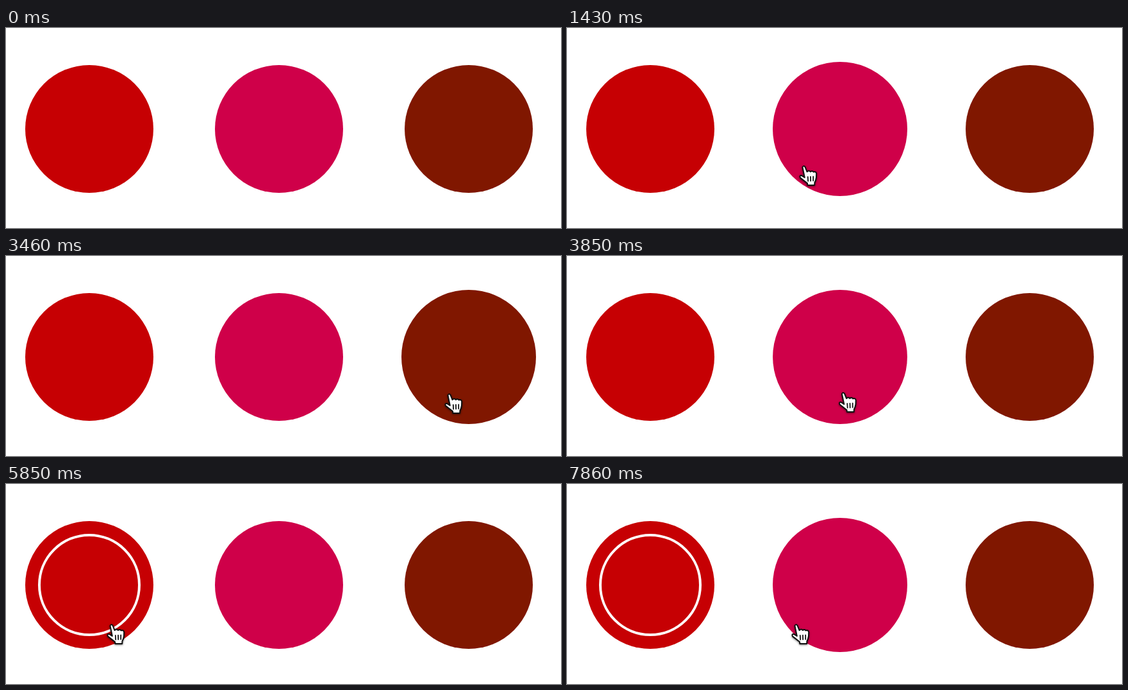
An HTML page for the animation above (8000 ms loop, 866 by 313 pixels).

```html
<!DOCTYPE html>
<html lang="en">
<head>
<meta charset="utf-8">
<title>Colour choices</title>
<style>
  html, body { margin: 0; width: 100%; height: 100%; overflow: hidden; background: #fff; }
  svg { display: block; }
  #hand { filter: drop-shadow(0 1.5px 1.5px rgba(0, 0, 0, .55)); }
</style>
</head>
<body>
<svg width="866" height="313" viewBox="0 0 866 313">
  <circle class="dot" cx="130" cy="158" r="100" fill="#c60003"/>
  <circle id="ring" cx="130" cy="158" r="78" fill="none" stroke="#fff" stroke-width="4" opacity="0"/>
  <circle class="dot" cx="426" cy="158" r="100" fill="#cf0049"/>
  <circle class="dot" cx="722" cy="158" r="100" fill="#801700"/>
  <g id="hand" visibility="hidden" stroke="#111" stroke-linejoin="round" stroke-linecap="round">
    <path fill="#fff" stroke-width="2" d="M-1.5 2 Q0-1.5 2.5 1.5 L5.5 9 Q8.5 6 10.8 9 Q13.6 6.6 15.6 9.4 Q19 8 20.2 11.5 L20 18 Q19.4 22.5 17.4 26 L17.2 30 L6.4 30 L6 27 Q1.5 23.5-4.8 18.6 Q-6.8 14.6-3 14.8 L1.8 18 Z"/>
    <path fill="none" stroke-width="1.8" d="M6.8 17 l.4 6.6 M11 16.6 l.2 6.8 M15.2 16.4 l0 6.6"/>
  </g>
</svg>
<script>
const LOOP = 8000, FRAME = 79, FADE = 220, CLICK = 5250;
const RADIUS = 100, GROWTH = 5, RING = 78;
const ENTRY = { x: 240, y: 311 };

// Pointer moves: start, end, where it comes to rest, how far the path sags
const moves = [
  [160, 790, 167, 222, 20],
  [950, 1430, 369, 216, 15],
  [2090, 2880, 691, 216, 10],
  [3460, 4090, 416, 213, 8],
  [4330, 4810, 149, 207, 0],
  [4970, 5130, 163, 214, 0],
  [5290, 5600, 164, 220, 0],
  [5850, 6650, 256, 272, 40],
  [6730, 7450, 360, 217, 5],
  [7820, 7860, 357, 220, 0]
].map(([start, end, x, y, sag]) => ({ start, end, x, y, sag }));

const dots = [...document.querySelectorAll('.dot')];
const ring = document.getElementById('ring');
const hand = document.getElementById('hand');

const clamp = p => Math.max(0, Math.min(1, p));
const easeOut = (p, power) => 1 - (1 - clamp(p)) ** power;
const fade = (t, start) => easeOut((t - start) / FADE, 2);
const moveAt = t => moves.findLastIndex(m => t >= m.start);

function pointer(t) {
  const i = moveAt(t);
  if (i < 0) return ENTRY;
  const from = moves[i - 1] || ENTRY, to = moves[i];
  const p = easeOut((t - to.start) / (to.end - to.start), 3);
  return {
    x: from.x + (to.x - from.x) * p,
    y: from.y + (to.y - from.y) * p + 2 * to.sag * p * (1 - p)
  };
}

// Movement is shown in even steps and holds still between moves
function snap(t) {
  const move = moves[moveAt(t)];
  if (!move) return 0;
  const span = move.end - move.start;
  const step = span / Math.round(span / FRAME || 1) || span;
  return Math.min(move.end, move.start + Math.floor((t - move.start) / step + .1) * step);
}

// Times at which the pointer enters and leaves each dot; a chosen dot stays at rest
const toggles = dots.map((dot, i) => {
  const times = [];
  for (let t = 0; t < LOOP; t += 5) {
    const { x, y } = pointer(t);
    const near = Math.hypot(x - dot.cx.baseVal.value, y - dot.cy.baseVal.value) < RADIUS;
    const hovered = near && !(i === 0 && t >= CLICK);
    if (hovered !== (times.length % 2 === 1)) times.push(t);
  }
  return times;
});

function draw(time) {
  const t = snap(time % LOOP);
  const scales = toggles.map(times => 1 + GROWTH / RADIUS *
    times.reduce((sum, at, k) => sum + (k % 2 ? -1 : 1) * fade(t, at), 0));
  dots.forEach((dot, i) => dot.setAttribute('r', RADIUS * scales[i]));
  ring.setAttribute('r', RING * scales[0]);
  ring.setAttribute('opacity', fade(t, CLICK));
  const { x, y } = pointer(t);
  hand.setAttribute('transform', `translate(${x} ${y})`);
  hand.setAttribute('visibility', t < moves[0].start ? 'hidden' : 'visible');
}

const begin = performance.now();
function tick() {
  draw(performance.now() - begin);
  requestAnimationFrame(tick);
}
tick();
</script>
</body>
</html>
```
